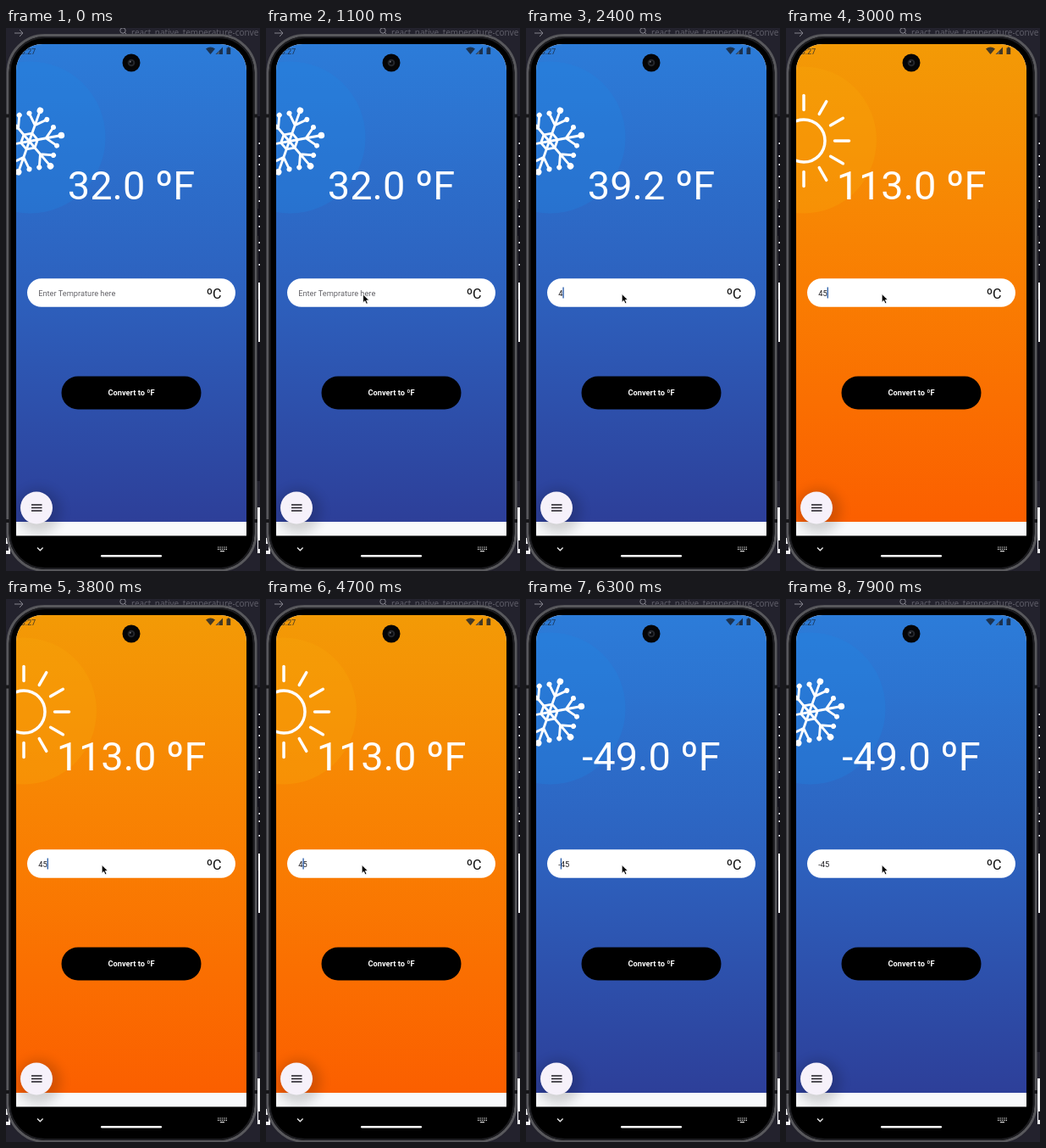
These frames come from a looping animation (300 by 640 pixels, 8 s). An HTML page:

```html
<!DOCTYPE html>
<html lang="en">
<head>
<meta charset="utf-8">
<title>Temperature converter</title>
<style>
  html, body { margin: 0; width: 100%; height: 100%; overflow: hidden; background: #23222d; }
  svg { display: block; width: 300px; height: 640px; font-family: Roboto, sans-serif; }
</style>
</head>
<body>
<svg viewBox="0 0 300 640" xmlns="http://www.w3.org/2000/svg">
  <defs>
    <linearGradient id="cold" x1="0" y1="0" x2="0" y2="1">
      <stop offset="0" stop-color="#2c7cd9"/>
      <stop offset=".5" stop-color="#2d62bf"/>
      <stop offset="1" stop-color="#2d3f99"/>
    </linearGradient>
    <linearGradient id="hot" x1="0" y1="0" x2="0" y2="1">
      <stop offset="0" stop-color="#f39a06"/>
      <stop offset=".5" stop-color="#f97e02"/>
      <stop offset="1" stop-color="#fb5f00"/>
    </linearGradient>
    <clipPath id="screen"><rect x="12" y="19" width="272" height="609" rx="31"/></clipPath>
    <filter id="shadow" x="-80%" y="-80%" width="260%" height="260%"><feGaussianBlur stdDeviation="7"/></filter>
  </defs>

  <!-- desktop behind the phone -->
  <rect width="300" height="640" fill="#23222d"/>
  <g fill="none" stroke="#85848d" stroke-width="1">
    <path d="M10 6h10m-4-4 4 4-4 4"/>
    <circle cx="138" cy="3" r="3.2"/><path d="m140 5 3 3"/>
  </g>
  <text x="148" y="9" font-size="10" fill="#62616c" font-family="Open Sans, sans-serif">react_native_temperature-conve</text>
  <rect x="296" y="104" width="4" height="430" fill="#111019"/>
  <path id="scraps" stroke="#e9e9ee" stroke-width="2"/>
  <path d="M298 300h2v70h-2zM297 565h3v54h-3zM0 601h5v19H0z" fill="#f0f0f2"/>
  <path d="M0 608h3v8H0zM298 604h2v10h-2z" fill="#22212a"/>

  <!-- phone body -->
  <rect x="2" y="8.500" width="293" height="631" rx="44" stroke="#58585c" stroke-width="3"/>
  <rect x="4.500" y="11" width="288" height="626" rx="41.500" stroke="#1d1d21" stroke-width="2"/>
  <path d="M0 103.500h4M0 581h4M293 103.500h4M293 581h4" stroke="#17171a" stroke-width="4"/>
  <path d="M297 175v38M297 245v75" stroke="#2c2c31" stroke-width="2"/>

  <g clip-path="url(#screen)">
    <rect x="12" y="19" width="272" height="580" fill="#f8f9fb"/>
    <rect id="sky" x="12" y="19" width="272" height="563"/>

    <g id="snow">
      <circle cx="28" cy="129" r="89.500" fill="#1f86e2" opacity=".3"/>
      <g id="flake" transform="translate(27.500 133.500) rotate(-10.500)" fill="none" stroke="#fff" stroke-width="2.900"/>
    </g>
    <g id="sun">
      <circle cx="20.500" cy="132" r="86.500" fill="#f6a50b" opacity=".34"/>
      <g id="rays" transform="translate(21 133)" fill="none" stroke="#fff" stroke-width="3.500" stroke-linecap="round">
        <circle r="25"/>
      </g>
    </g>

    <!-- status bar -->
    <g fill="#17202e" opacity=".8">
      <text x="17.500" y="31" font-size="9.200">5:27</text>
      <path d="M236 24.500q5.500-4 11 0l-5.500 6.500zM256 22.500v8.500h-8.500zM260.500 23.500h1.200v-1h2.300v1h1.200v7.500h-4.700z"/>
    </g>
    <path d="M252 27v4h-3.500z" fill="#fff" opacity=".2"/>

    <text id="result" x="148" y="201.700" font-size="46.900" fill="#fff" text-anchor="middle"></text>

    <rect x="25" y="295.300" width="246" height="33.500" rx="16.750" fill="#fff"/>
    <text id="entry" x="38.200" y="315.800" font-size="9.250"></text>
    <rect id="caret" y="305.500" width="1.300" height="13" fill="#2358a8"/>
    <text x="236.700" y="318.500" font-size="16.200" fill="#111">ºC</text>

    <rect x="65.500" y="410.500" width="165" height="39" rx="19.500"/>
    <text x="148" y="433.400" font-size="9.250" font-weight="700" fill="#fff" text-anchor="middle">Convert to ºF</text>

    <circle cx="39" cy="569" r="26" opacity=".16" filter="url(#shadow)"/>
    <rect x="12" y="598.500" width="272" height="30"/>
    <circle cx="36" cy="565.500" r="19" fill="#f6f1fa"/>
    <path d="M30 562h12.500M30 565.500h12.500M30 569h12.500" stroke="#1d1b20" stroke-width="1.300"/>
  </g>

  <!-- navigation bar -->
  <path d="m37 612.500 3.300 3.300 3.300-3.300" fill="none" stroke="#e8e8e8" stroke-width="1.400"/>
  <rect x="112" y="621" width="72" height="2.500" rx="1.250" fill="#fff"/>
  <g fill="none" stroke="#ddd" stroke-width="1.200">
    <path d="M250 612h11M250 614.300h11" stroke-dasharray="1.400 1"/>
    <path d="M253 616.600h5"/>
  </g>

  <!-- camera -->
  <circle cx="148" cy="41" r="10.500" fill="#050506"/>
  <circle cx="148" cy="41" r="4.300" fill="#24262b"/>
  <circle cx="148" cy="41" r="2.300" fill="#090a0d"/>
  <circle cx="146.800" cy="39.800" r="1" fill="#6b6e74"/>

  <path id="pointer" d="M0 0v9.800l2.300-2.100 1.600 3.600 1.800-.8-1.600-3.500h3.100z" fill="#000" stroke="#fff" stroke-width=".8"/>
</svg>

<script>
  const LOOP = 8000;
  const $ = id => document.getElementById(id);
  const set = (id, attrs) => Object.entries(attrs).forEach(([k, v]) => $(id).setAttribute(k, v));
  const show = (id, on) => set(id, { visibility: on ? 'visible' : 'hidden' });

  // Each step holds until the next: start, field text, caret index (-1 = no focus), result
  const STEPS = [
    [0, '', -1, '32.0'],
    [1300, '', 0, '32.0'],
    [2300, '4', 1, '32.0'],
    [2400, '4', 1, '39.2'],
    [2600, '45', 2, '113.0'],
    [4600, '45', 1, '113.0'],
    [5200, '45', 0, '113.0'],
    [6300, '-45', 1, '-49.0']
  ];

  function buildArt() {
    const arm = a => `<g transform="rotate(${a})">
      <path d="M0 0H37M20 0 31-11M20 0 31 11M10 0 5 8.660"/>
      <g fill="#fff" stroke="none"><circle cx="38.500" r="3.800"/>
      <circle cx="31" cy="-11" r="3"/><circle cx="31" cy="11" r="3"/></g></g>`;
    for (let a = 0; a < 360; a += 60) $('flake').innerHTML += arm(a);

    for (let a = 0; a < 360; a += 30)
      $('rays').innerHTML += `<path d="M36.500 0H53.500" transform="rotate(${a})"/>`;

    let d = '';
    for (let y = 136; y < 290; y += 9 + (y * 7) % 11) d += `M298.500 ${y}h2`;
    set('scraps', { d });
  }

  function drawPointer(t) {
    const p = Math.min(1, Math.max(0, (t - 700) / 500));
    const rest = (1 - p) ** 3;
    show('pointer', p > 0);
    set('pointer', { transform: `translate(${113.2 + 180 * rest} ${313.5 + 60 * rest})` });
  }

  function draw(t) {
    const [start, text, caret, value] = STEPS.filter(s => s[0] <= t).pop();
    const hot = value === '113.0';
    set('sky', { fill: `url(#${hot ? 'hot' : 'cold'})` });
    show('snow', !hot);
    show('sun', hot);
    $('result').textContent = value + ' ºF';

    const entry = $('entry');
    entry.textContent = text || 'Enter Temprature here';
    set('entry', { fill: text ? '#1c1b1f' : '#66656a' });

    const offset = caret > 0 ? entry.getSubStringLength(0, caret) : 0;
    show('caret', caret >= 0 && (t - start) % 1000 < 500);
    set('caret', { x: 38.2 + offset });
    drawPointer(t);
  }

  buildArt();
  const origin = performance.now();
  function tick() {
    draw((performance.now() - origin) % LOOP);
    requestAnimationFrame(tick);
  }
  tick();
</script>
</body>
</html>
```
